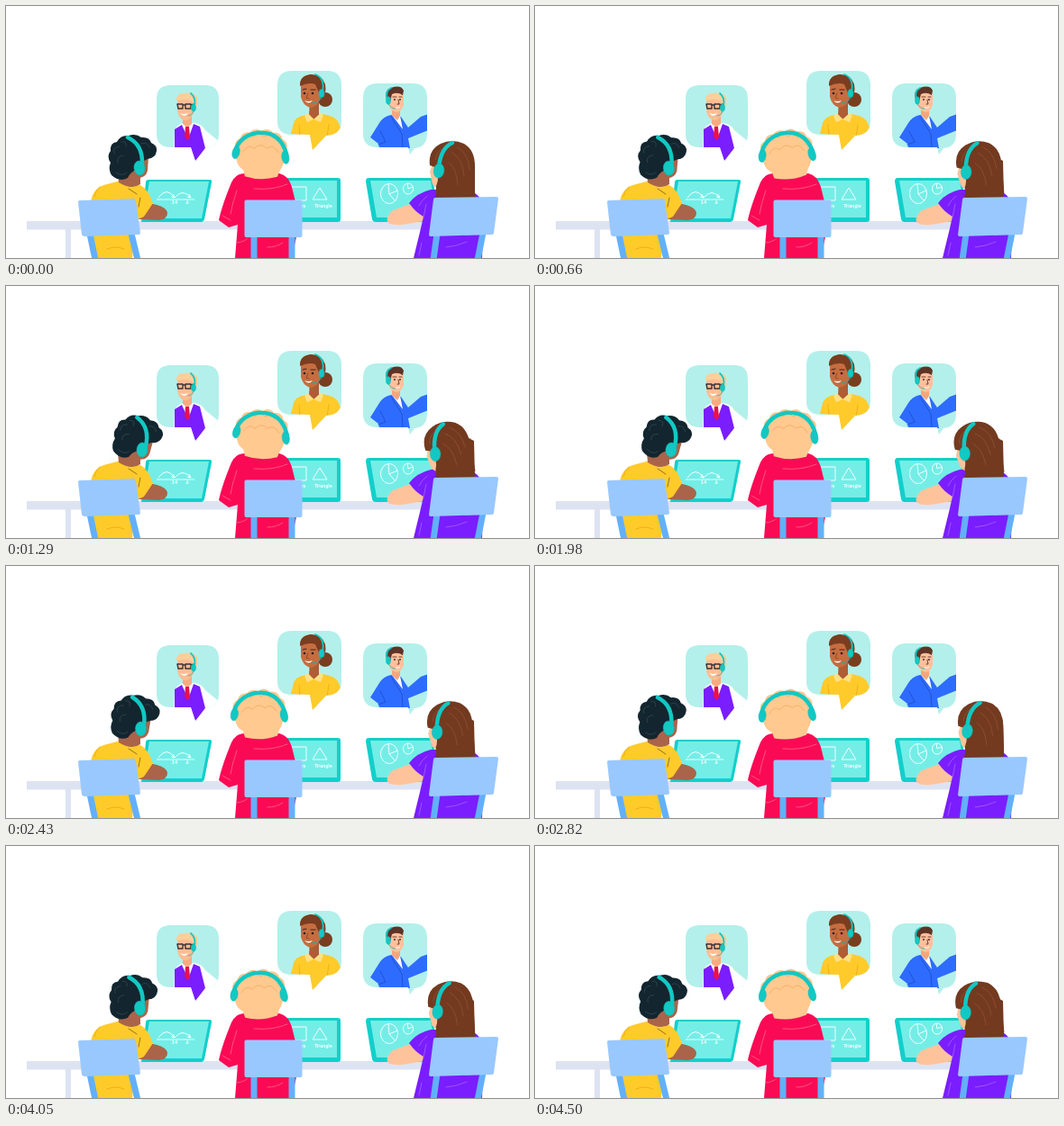
Recreate the animation shown at these times as an HTML page. Size 580 by 280 pixels, loop 4530 ms.

```html
<!DOCTYPE html>
<html lang="en">
<head>
<meta charset="utf-8">
<title>Online lesson</title>
<style>
  html, body { margin: 0; width: 100%; height: 100%; overflow: hidden; background: #fff; }
  svg { display: block; width: 580px; height: 280px; }
  text { font: bold 5.5px Lato, sans-serif; fill: #fff; text-anchor: middle; }
  .line { fill: none; stroke-linecap: round; stroke-linejoin: round; }
  .band { fill: none; stroke: #13c8c3; stroke-width: 4.5; stroke-linecap: round; }
  .cup { fill: #13c8c3; stroke: #10b8b4; stroke-width: .5; }
  .chalk { fill: none; stroke: #fff; stroke-width: .9; stroke-linejoin: round; }
  .lid { fill: #13cfcb; }
  .screen { fill: #74ede7; }
  .chair { fill: #99c8ff; }
  .leg { fill: none; stroke: #62b0fa; stroke-width: 7; }
  .bubble { fill: #b3f0eb; }
  .yellow { fill: #ffcb2b; }
  .brown { fill: #a9644a; }
  .skin { fill: #ffc39b; }
  .small .band { stroke-width: 1.8; }
</style>
</head>
<body>
<svg viewBox="0 0 580 280">
  <defs>
    <clipPath id="clip1"><path d="M183 88H221Q236 88 236 103V142Q236 157 221 158L210 172L205 157H183Q167 157 167 142V103Q167 88 183 88Z"/></clipPath>
    <clipPath id="clip2"><path d="M317 72H356Q372 72 372 88V128Q372 143 355 144L340 160L337 143H317Q301 143 301 128V88Q301 72 317 72Z"/></clipPath>
    <clipPath id="clip3"><path d="M412 86H451Q467 86 467 102V142Q467 157 453 158L448 165L446 157H412Q396 157 396 142V102Q396 86 412 86Z"/></clipPath>
  </defs>

  <!-- teachers -->
  <g class="small" clip-path="url(#clip1)">
    <path class="bubble" d="M160 80H240V180H160Z"/>
    <path fill="#fff" d="M186 158L187 138Q189 132 197 130L209 130Q217 131 221 138L238 152V180H186Z"/>
    <path fill="#7a1dff" d="M187 158V137L195 132L202 148L208 131L215 134L221 158L210 173L205 158Z"/>
    <path fill="#f9ab80" d="M196 121H206V131L201 135L196 131Z"/>
    <path fill="#e8104c" d="M199 134H203L204 146L201 149L198 145Z"/>
    <path fill="#ffbd93" d="M190 104Q198 99 209 105V117Q205 127 198 127Q191 125 190 116Z"/>
    <path fill="#fad09b" d="M189 105Q188 98 195 97Q209 95 212 101Q214 110 209 115L206 105Q198 102 189 105Z"/>
    <path class="line" stroke="#3b3136" stroke-width="1.4" d="M190 109H196V114H191ZM199 109H205V114H199ZM196 110H199M205 110L209 109"/>
    <path fill="#fff" d="M193 119Q197 121 202 119Q198 125 193 119Z"/>
    <path class="band" d="M205 97Q211 102 209 111"/>
    <ellipse class="cup" cx="208" cy="113" rx="2.6" ry="4"/>
    <path class="line" stroke="#13b0ac" stroke-width=".8" d="M208 117Q206 122 202 122"/>
  </g>
  <g class="small" clip-path="url(#clip2)">
    <path class="bubble" d="M290 65H380V165H290Z"/>
    <circle cx="354" cy="104" r="8" fill="#7a3d20"/>
    <path class="yellow" d="M316 142L319 130Q321 123 332 121L351 120Q364 122 368 128L373 140L352 165H334L335 143Z"/>
    <path fill="#b05c35" d="M337 106H347V121L342 126L336 121Z"/>
    <path fill="#c66d40" d="M327 89Q336 79 349 88V102Q345 113 337 113Q329 110 327 101Z"/>
    <path fill="#7a3d20" d="M326 89Q325 78 337 76Q350 75 354 87Q356 98 350 102Q346 95 343 87Q336 84 326 89Z"/>
    <path fill="#ffe08a" d="M335 119L341 126L334 129L331 122ZM349 119L341 126L349 129L352 121Z"/>
    <path class="band" d="M343 76Q354 80 351 96"/>
    <ellipse class="cup" cx="350" cy="97" rx="3" ry="4.6"/>
    <path class="line" stroke="#13b0ac" stroke-width=".9" d="M350 102Q347 108 340 107"/>
    <path class="line" stroke="#4a2418" stroke-width="1.2" d="M329 93L333 92M338 93L343 93"/>
    <g fill="#2c1c1b"><circle cx="331" cy="97" r="1.3"/><circle cx="340" cy="97" r="1.3"/></g>
    <path class="line" stroke="#95492b" d="M335 97L333 102L336 103"/>
    <path fill="#fff" d="M331 105Q335 107 340 105Q336 110 331 105Z"/>
    <path class="line" stroke="#e6ab10" stroke-width=".8" d="M325 132L326 143M358 132L356 145"/>
  </g>
  <g class="small" clip-path="url(#clip3)">
    <path class="bubble" d="M390 80H470V170H390Z"/>
    <path fill="#2e6cff" d="M404 146L414 130Q418 123 427 121L438 123L446 135L460 123L468 120V138L446 147L448 158H414L413 153Z"/>
    <path fill="#fff" d="M428 121L437 122L440 137Z"/>
    <path fill="#f5a57d" d="M428 113H437V122L434 127L428 121Z"/>
    <path fill="#ffc09a" d="M424 98Q433 92 441 98V110Q438 118 433 118Q425 116 424 109Z"/>
    <path fill="#5e3426" d="M422 104Q419 93 427 91Q438 87 441 94L440 99Q434 95 428 98L426 106Z"/>
    <path class="band" d="M427 91Q420 95 423 103"/>
    <ellipse class="cup" cx="424" cy="105" rx="2.5" ry="4.2"/>
    <path class="line" stroke="#13b0ac" stroke-width=".8" d="M424 109Q427 114 432 114"/>
    <g fill="#30242b"><circle cx="431" cy="104" r=".9"/><circle cx="437" cy="104" r=".9"/></g>
    <path class="line" stroke="#5e3426" stroke-width=".9" d="M429 101H433M436 101H439M435 104L436 109H434"/>
    <path class="line" stroke="#fff" d="M432 113Q435 114 437 112"/>
    <path class="line" stroke="#1c4bc9" stroke-width=".8" d="M427 123L439 142L440 157M415 139L421 151L413 154"/>
  </g>

  <!-- desk and laptops -->
  <path fill="#dde3f1" d="M23 239H535V248.500H72V280H66V248.500H23Z"/>
  <path class="lid" d="M158 193H226Q229 193 228 196L220 237Q219 240 216 240H150L155 196Q155 193 158 193Z"/>
  <path class="screen" d="M159 195H225L217 236H152Z"/>
  <path class="chalk" d="M167 215H209M169 213Q178 200 187 213Q196 202 205 213M185 209L187 213L183 212M203 209L205 213L201 212"/>
  <text x="187" y="220">14</text><text x="201" y="220">6</text>
  <path class="lid" d="M298 191H368Q371 191 371 194V237Q371 240 368 240H298Z"/>
  <path class="screen" d="M298 194H367V235H298Z"/>
  <path class="chalk" d="M317 201H333V216H317ZM348 202L356 215H340Z"/>
  <text x="324" y="224">Square</text><text x="352" y="224">Triangle</text>
  <path class="lid" d="M402 191H471Q474 191 474 194L479 240H410Q407 240 406 237L399 195Q399 191 402 191Z"/>
  <path class="screen" d="M404 194H471L477 235H411Z"/>
  <g class="chalk">
    <ellipse cx="425" cy="208.500" rx="9.500" ry="11"/><path d="M424 198L425 209L434 205M425 209L432 217"/>
    <ellipse cx="446" cy="203" rx="5.500" ry="6"/><path d="M445 197L446 203L451 201"/>
  </g>

  <!-- left pupil -->
  <path class="brown" d="M150 217L163 220Q178 223 179 230Q179 237 169 238L147 237Z"/>
  <path class="yellow" d="M94 217Q97 201 112 198L127 194L149 199Q158 204 163 219L153 234L144 238L140 280H101L95 258Z"/>
  <path class="line" stroke="#5f4a2b" stroke-width=".7" d="M136 203L145 209M149 213L147 223"/>
  <path class="line" stroke="#eba90c" stroke-width=".8" d="M104 201Q99 206 98 212M112 270Q121 266 131 270"/>
  <path class="brown" d="M124 185H149V198Q139 205 125 196Z"/>
  <g id="boy">
    <path class="brown" d="M143 167L158 167L157 183Q155 191 146 191L128 196Z"/>
    <path fill="#13262f" d="M117 188Q113 181 116 174Q111 167 116 161Q115 152 123 151Q127 143 136 144Q144 141 150 146Q159 145 161 152Q168 155 167 161Q166 169 157 170L151 173L146 181Q138 184 135 191Q126 196 117 188Z"/>
    <path class="line" stroke="#3c525a" stroke-width=".6" d="M120 164Q118 157 126 156M124 174Q122 167 130 166M122 185Q129 190 134 185M128 151Q134 149 133 156M150 153Q156 150 159 157"/>
    <path class="band" d="M135 146Q152 154 151 176"/>
    <ellipse class="cup" cx="148" cy="180" rx="6" ry="8" transform="rotate(-8 148 180)"/>
  </g>
  <path class="leg" d="M93 253L99 282M139 253L146 282"/>
  <path class="chair" d="M82 216L142 214Q144 214 144 216L149 252Q149 254 147 254L87 256Q85 256 84 254L80 218Q80 216 82 216Z"/>

  <!-- middle pupil -->
  <path fill="#fa0a55" d="M250 196Q254 187 264 186L303 186Q313 188 317 201L326 238L317 280H254L257 243L247 246L236 238Q239 223 250 196Z"/>
  <path class="line" stroke="#ff6684" stroke-width=".8" d="M256 205Q251 219 249 231M275 203Q295 205 312 198M240 233L249 238M256 263Q265 262 268 258M290 268Q300 268 307 263"/>
  <g id="blond">
    <path fill="#ffc98f" d="M255 172Q250 166 253 159Q251 151 258 148Q260 140 268 141Q274 135 281 139Q288 134 294 140Q303 139 305 147Q312 150 310 158Q313 166 308 172Q306 179 303 183L301 189Q283 195 265 190L263 183Q256 179 255 172Z"/>
    <path class="line" stroke="#eda75c" stroke-width=".7" d="M265 147Q268 141 273 145Q279 139 284 145Q291 140 295 147M262 162Q268 153 274 159Q281 151 288 158Q295 152 301 162"/>
    <path class="band" d="M253 162Q258 145 277 141Q302 138 310 163"/>
    <ellipse class="cup" cx="254" cy="164" rx="4" ry="7" transform="rotate(12 254 164)"/>
    <ellipse class="cup" cx="309" cy="167" rx="4" ry="7.300" transform="rotate(-12 309 167)"/>
  </g>
  <path class="leg" d="M275 254V282M317 254V282"/>
  <rect class="chair" x="264.500" y="215.500" width="64" height="41.500" rx="2"/>

  <!-- right pupil -->
  <path class="skin" d="M462 217L445 221L429 227Q421 233 423 240Q428 244 439 243L464 239Z"/>
  <path fill="#7a1dff" d="M447 219Q455 208 471 204H513Q526 209 530 222L528 280H452L460 247L463 234Q454 229 447 219Z"/>
  <path class="line" stroke="#a466ff" stroke-width=".8" d="M467 211Q460 217 458 222M466 220L463 235M461 263L458 277M488 268Q500 267 511 262"/>
  <path fill="#733a20" d="M476 212L482 180Q500 160 519 172L520 213Z"/>
  <g id="girl">
    <path class="skin" d="M475 170L470 184L473 198Q477 204 486 203L490 174Z"/>
    <path fill="#733a20" d="M470 177Q468 160 482 153Q495 147 508 153Q520 160 520 178V210Q510 213 477 212V200Q481 191 478 180Z"/>
    <path class="line" stroke="#96593a" stroke-width=".6" d="M501 157Q513 164 514 182M495 163Q507 170 508 189M491 174Q500 180 501 199M476 171Q477 163 483 159"/>
    <path class="band" d="M495 152Q482 158 480 179"/>
    <ellipse class="cup" cx="480" cy="183" rx="5.800" ry="8" transform="rotate(8 480 183)"/>
  </g>
  <path class="leg" d="M478 253L474 282M529 252L523 282"/>
  <path class="chair" d="M476 213L544 212Q546 212 546 214L541 252Q541 254 539 254L471 256Q469 256 469 254L474 215Q474 213 476 213Z"/>
</svg>
<script>
const LOOP = 4530;
const times = [0, 660, 1290, 1980, 2820, 3540, 4500];
// Head tilt in degrees at each of the times, and the neck it turns about.
const heads = [
  { id: "boy", neck: "140 195", tilt: [0, 1.5, 12, 12, 1, 0, 3] },
  { id: "blond", neck: "283 187", tilt: [2.5, -5, 4, 2.5, -5, 0, -4.5] },
  { id: "girl", neck: "497 205", tilt: [0, -5, -11, -9.5, -1.5, 0, -6.5] }
].map(head => ({ ...head, node: document.getElementById(head.id) }));

function tiltAt(keys, time) {
  let i = 0;
  while (i < times.length - 2 && time >= times[i + 1]) i++;
  const p = Math.min(1, (time - times[i]) / (times[i + 1] - times[i]));
  return keys[i] + (keys[i + 1] - keys[i]) * p * p * (3 - 2 * p);
}

function draw() {
  const time = performance.now() % LOOP;
  for (const { node, neck, tilt } of heads)
    node.setAttribute("transform", `rotate(${tiltAt(tilt, time)} ${neck})`);
  requestAnimationFrame(draw);
}
draw();
</script>
</body>
</html>
```
